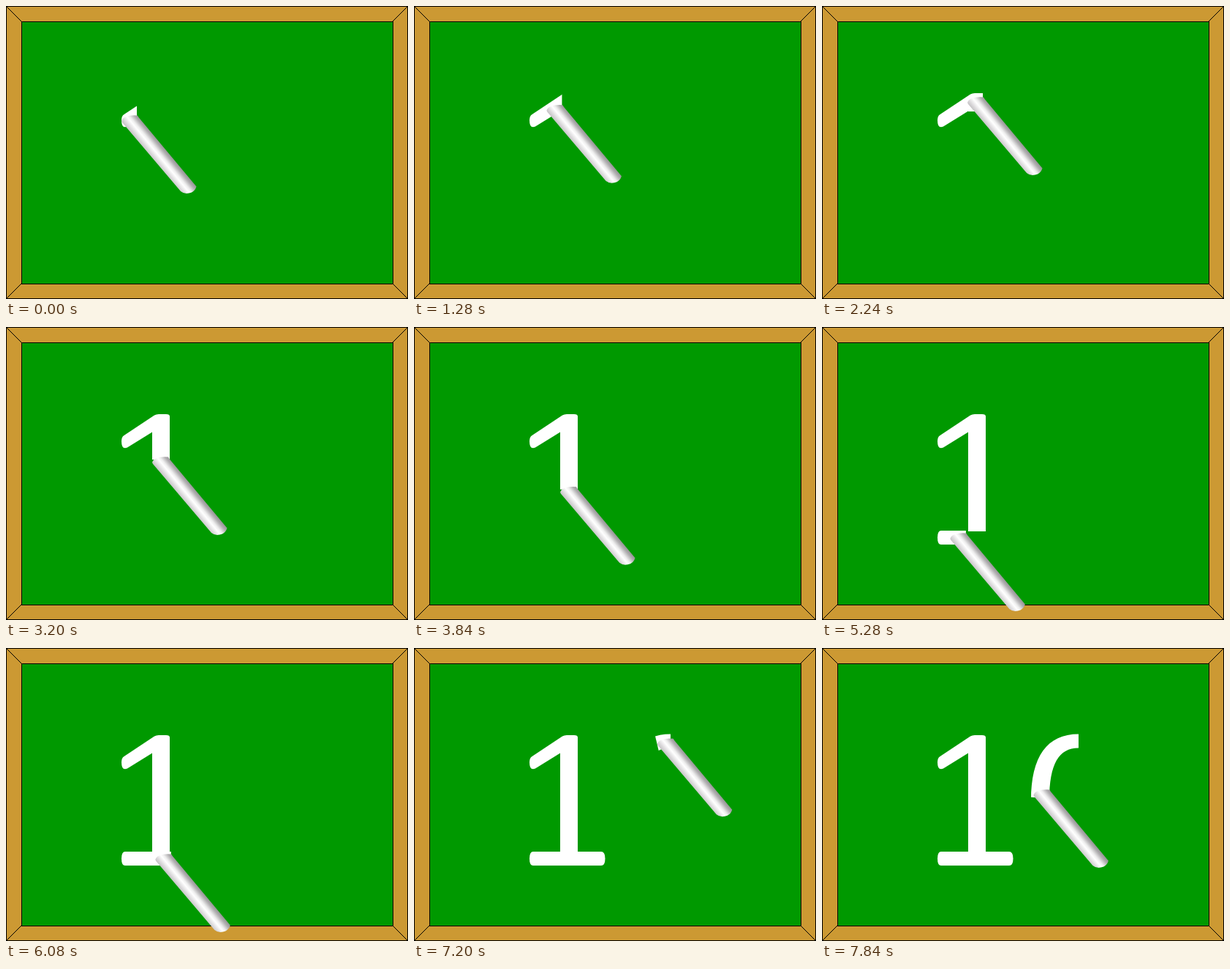
Animation, 550 px wide and 400 px high, one loop 8 s. Source, as an HTML page with a canvas:

```html
<!DOCTYPE html>
<html lang="en">
<head>
<meta charset="utf-8">
<title>Chalk writing on a board</title>
<style>
  html, body { margin: 0; width: 100%; height: 100%; overflow: hidden; }
  canvas { display: block; }
</style>
</head>
<body>
<canvas id="board" width="550" height="400"></canvas>
<script>
const ctx = document.getElementById('board').getContext('2d');
const STEP = 160, STEPS = 50;
// First step of each pen stroke after the flag of the "1"
const STEM = 15, BASE = 30, ZERO = 45;
const ZERO_CENTER = { x: 351, y: 208 };

const flag = new Path2D('M158 156Q158 150 161.5 148L203 120.5Q205.500 119 209 119H219Q224 119 224 122V144H200V143.500L166 164.500Q158 168 158 156Z');
const stem = new Path2D('M200 140H224V279H200Z');
const base = new Path2D('M163 278H256Q261.500 278 261.500 287.500T256 297H163Q158 297 158 287.500T163 278Z');
const zero = new Path2D('M351 117.500C308 117.500 286 148 286 208H311C311 158 324 136.500 351 136.500Z');
const chalk = new Path2D('M0 7Q1 3 5 1.500Q13 -1.500 22 -.5L23.500 2L102.500 96.500Q101 102 96 104.500Q87 108 81 103L1 9Z');

const shade = ctx.createLinearGradient(1, 9, 18, -5);
[[0, '#c4c2c4'], [0.2, '#dddbdd'], [0.45, '#fff'], [0.6, '#eee'], [0.85, '#b0aeb0'], [1, '#999']]
  .forEach(([stop, color]) => shade.addColorStop(stop, color));

// Chalk corner, plus the angle swept so far while writing the zero
function penAt(n) {
  if (n < STEM) return { x: 158 + 2.93 * n, y: 150 - 1.78 * n };
  if (n < BASE) return { x: 200, y: 127 + 10.2 * (n - STEM) };
  if (n < ZERO) return { x: 158 + 5.79 * (n - BASE), y: 282 };
  const k = n - ZERO;
  const phi = (10 + 23.2 * k - 1.24 * k * k) * Math.PI / 180;
  const dx = 53 * Math.sin(phi), dy = 81 * Math.cos(phi);
  return {
    x: ZERO_CENTER.x - dx - 9,
    y: ZERO_CENTER.y - dy - 4,
    sweep: Math.atan2(dx, dy) + 0.12
  };
}

function drawBoard() {
  ctx.fillStyle = '#cc9933';
  ctx.fillRect(0, 0, 550, 400);
  ctx.fillStyle = '#009900';
  ctx.fillRect(21, 21, 509, 359);
  ctx.strokeStyle = '#000';
  ctx.lineWidth = 1;
  ctx.strokeRect(0.5, 0.5, 549, 399);
  ctx.strokeRect(21.5, 21.5, 508, 358);
  ctx.beginPath();
  for (const [x, y, u, v] of [[0, 0, 21, 21], [550, 0, 529, 21], [0, 400, 21, 379], [550, 400, 529, 379]]) {
    ctx.moveTo(x, y);
    ctx.lineTo(u, v);
  }
  ctx.stroke();
}

function reveal(shape, region) {
  ctx.save();
  if (region) ctx.clip(region);
  ctx.fill(shape);
  ctx.restore();
}

function upTo(right, bottom) {
  const region = new Path2D();
  region.rect(0, 0, right, bottom);
  return region;
}

function wedge(angle) {
  const { x, y } = ZERO_CENTER, top = -Math.PI / 2;
  const region = new Path2D();
  region.moveTo(x, y);
  region.arc(x, y, 200, top - angle, top);
  region.closePath();
  return region;
}

function draw(n) {
  const pen = penAt(n);
  drawBoard();
  ctx.fillStyle = '#fff';
  reveal(flag, n < STEM && upTo(pen.x + 21, 400));
  if (n >= STEM) reveal(stem, n < BASE && upTo(550, pen.y + 3));
  if (n >= BASE) reveal(base, n < ZERO && upTo(pen.x + 21.5, 400));
  if (n >= ZERO) reveal(zero, wedge(pen.sweep));

  ctx.save();
  ctx.translate(pen.x, pen.y);
  ctx.fillStyle = shade;
  ctx.fill(chalk);
  ctx.restore();
}

function tick(now) {
  draw(Math.floor(now / STEP) % STEPS);
  requestAnimationFrame(tick);
}
draw(0);
requestAnimationFrame(tick);
</script>
</body>
</html>
```
